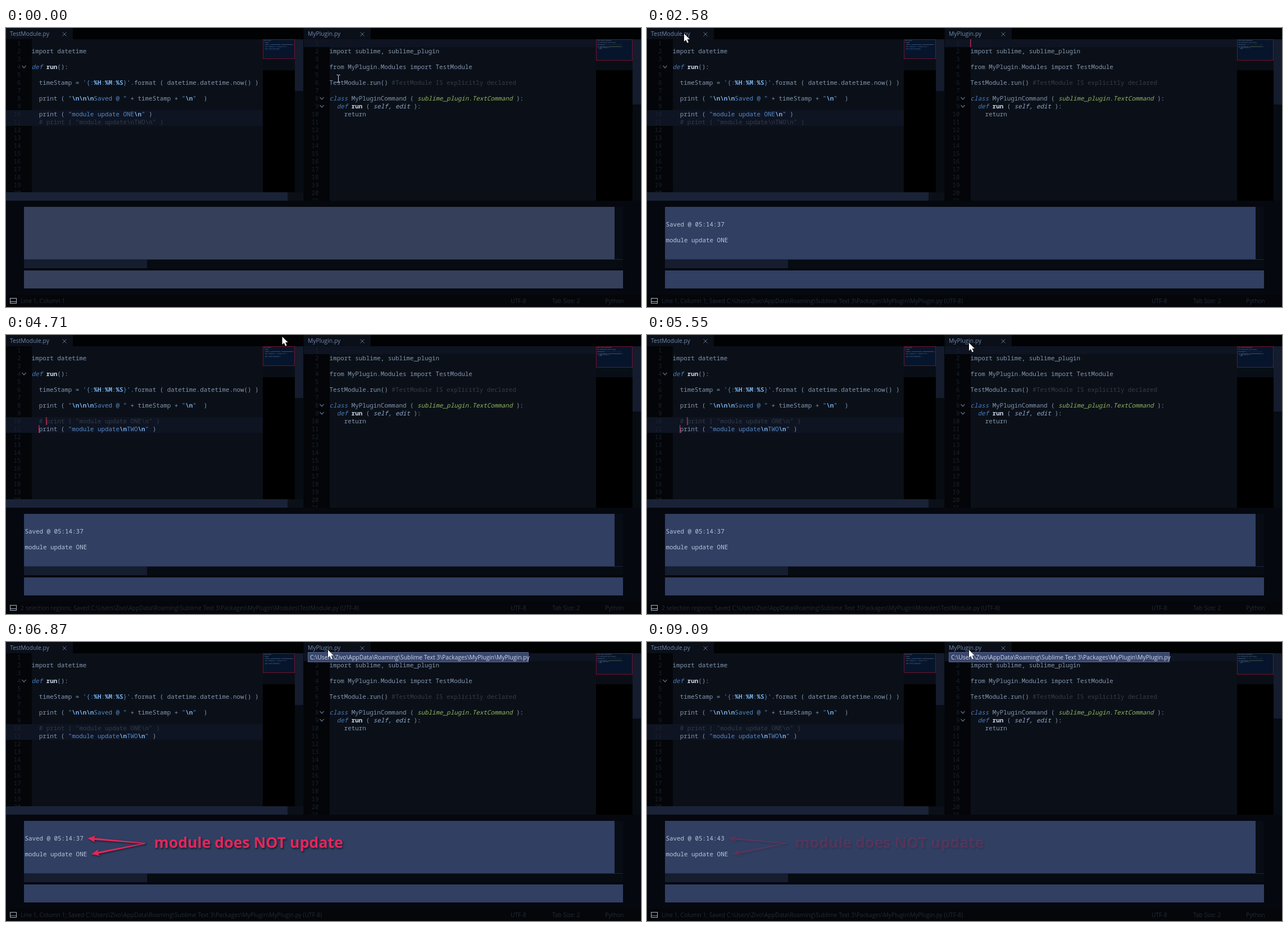
Recreate the animation shown at these times as an HTML page with a canvas. Size 1130 by 496 pixels, loop 9120 ms.

```html
<!DOCTYPE html>
<html lang="en">
<head>
<meta charset="utf-8">
<title>Plugin module reload</title>
<style>
html, body { margin: 0; width: 100%; height: 100%; overflow: hidden; background: #04070b; }
canvas { display: block; }
</style>
</head>
<body>
<canvas id="stage" width="1130" height="496"></canvas>
<script>
const ctx = document.getElementById('stage').getContext('2d');
const LOOP = 9120, CHAR = 6.516, ROW = 14;
const MONO = '10.86px "Noto Sans Mono", "DejaVu Sans Mono", monospace';
const UI = 'px "Open Sans", "Noto Sans", sans-serif';

// Each "~" starts a run: one style letter, then its text.
const STYLES = {
  d: ['', '#8396b0'], i: ['italic ', '#8fa8cc'], k: ['italic ', '#4a7cc0'],
  f: ['bold ', '#cbd6e8'], s: ['', '#5689c6'], e: ['bold ', '#78aee6'],
  c: ['', '#343c48'], g: ['italic ', '#90b55f']
};
const raw = String.raw;
const ONE = raw`module update ONE\n`, TWO = raw`module update\nTWO\n`;
const comment = s => `~c  # print ( "${s}" )`;
const print = s => '~d  print ( ~s"' + s.replace(/\\n/g, raw`~e\n~s`) + '"~d )';
const leftCode = swapped => ({
  2: '~dimport datetime',
  4: '~kdef~f run~d():',
  6: "~d  timeStamp = ~s'{:~e%H~s:~e%M~s:~e%S~s}'~d.format ( datetime.datetime.now() )",
  8: raw`~d  print ( ~s"~e\n\n\n~sSaved @ "~d + timeStamp + ~s"~e\n~s"~d  )`,
  10: swapped ? comment(ONE) : print(ONE),
  11: swapped ? print(TWO) : comment(TWO)
});
const rightCode = {
  2: '~dimport sublime, sublime_plugin',
  4: '~dfrom MyPlugin.Modules import TestModule',
  6: '~dTestModule.run() ~c#TestModule IS explicitly declared',
  8: '~kclass~d MyPluginCommand ( ~gsublime_plugin.TextCommand~d ):',
  9: '~k  def~f run~d ( ~iself, edit~d ):',
  10: '~d    return'
};

const ROOT = raw`C:\Users\Zivo\AppData\Roaming\Sublime Text 3\Packages\MyPlugin` + '\\';
const PLUGIN = ROOT + 'MyPlugin.py';
const MODULE = ROOT + raw`Modules\TestModule.py`;

// Event times in ms
const SAVE1 = 930, OUT1 = 1200, CLICK1 = 2610, TOGGLE = 3390, SAVE2 = 4080,
      CLICK2 = 5570, TIP = 6000, SAVE3 = 6870, OUT2 = 7140;
const RIGHT_BLINK = [[60, 390], [930, 1620], [2130, CLICK1], [CLICK2, TIP]];
const LEFT_BLINK = [[CLICK1, 3660], [4230, 4800], [4950, CLICK2]];
const PATH = [
  [0, 591, 90], [1740, 591, 90], [1950, 362, 58], [2150, 134, 20], [2340, 72, 10],
  [2430, 66, 10], [4200, 66, 10], [4320, 156, 8], [4500, 390, 5], [4710, 491, 3],
  [4800, 542, 7], [5010, 577, 13], [5160, 573, 14], [LOOP, 573, 14]
];

const clamp = v => Math.max(0, Math.min(1, v));
const during = (spans, t) => spans.some(([a, b]) => t >= a && t < b);

function box(x, y, w, h, color) {
  ctx.fillStyle = color;
  ctx.fillRect(x, y, w, h);
}

function text(s, x, y, font, color) {
  ctx.font = font;
  ctx.fillStyle = color;
  ctx.fillText(s, x, y);
}

function stroke(points, color, width = 1, close = false) {
  ctx.beginPath();
  points.forEach(([x, y]) => ctx.lineTo(x, y));
  if (close) ctx.closePath();
  ctx.strokeStyle = color;
  ctx.lineWidth = width;
  ctx.stroke();
}

function runs(line, draw) {
  let col = 0;
  for (const part of line.split('~').slice(1)) {
    const s = part.slice(1);
    draw(s, col, STYLES[part[0]]);
    col += s.length;
  }
}

function tab(x, name) {
  box(x, 0, 119, 20, '#0a0f18');
  text(name, x + 7, 14, 10.3 + UI, '#7189b0');
  const cx = x + 104, c = '#64748e';
  stroke([[cx - 3.5, 7.5], [cx + 3.5, 14.5]], c);
  stroke([[cx + 3.5, 7.5], [cx - 3.5, 14.5]], c);
}

function pane(p, code) {
  const { x, map, mapW, right, bottom } = p;
  ctx.save();
  ctx.beginPath();
  ctx.rect(x, 0, right - x, bottom);
  ctx.clip();
  box(x, 0, right - x, 20, '#010203');
  tab(x, p.name);
  box(x, 20, 46, bottom, '#030508');
  box(x + 46, 20, map - x - 46, bottom, '#0b1018');
  box(x, p.hot, map - x, p.hotH, '#0e1422');
  for (let n = 1; n <= 21; n++) {
    const y = 31 + ROW * (n - 1), s = String(n);
    text(s, x + 26.5 - CHAR * s.length, y, MONO, '#1b232e');
    if (code[n]) runs(code[n], (run, col, [style, color]) =>
      text(run, x + 45.6 + CHAR * col, y, style + MONO, color));
  }
  for (const n of p.folds) {
    const y = 27 + ROW * (n - 1);
    stroke([[x + 28.5, y - 2], [x + 32, y + 2], [x + 35.5, y - 2]], '#5b6b84', 1.3);
  }
  minimap(map, mapW, p.viewH, code);
  box(map + mapW, 20, right - map - mapW, bottom, '#070b12');
  box(map + mapW, 20, right - map - mapW, p.thumb, '#141c2d');
  ctx.restore();
}

function minimap(x, w, h, code) {
  box(x, 20, w, 55, '#090e16');
  box(x, 75, w, 240, '#000');
  box(x, 20, w, h, '#06152c');
  ctx.globalAlpha = 0.45;
  for (const n in code) runs(code[n], (run, col, [, color]) => {
    for (const m of run.matchAll(/\S+/g))
      box(x + 2 + 0.85 * (col + m.index), 20 + 1.8 * (n - 1), 0.85 * m[0].length, 1, color);
  });
  ctx.globalAlpha = 1;
  ctx.strokeStyle = '#74112a';
  ctx.lineWidth = 1;
  ctx.strokeRect(x + 0.5, 20.5, w - 1, h - 1);
}

function statusText(t) {
  const place = t >= CLICK1 && t < CLICK2 ? '2 selection regions' : 'Line 1, Column 1';
  if (t < SAVE1) return place;
  const file = t >= SAVE2 && t < SAVE3 ? MODULE : PLUGIN;
  return `${place}; Saved ${file} (UTF-8)`;
}

function panel(t) {
  box(0, 307, 1130, 167, '#05080e');
  box(0, 474, 1130, 22, '#04060a');
  const tint = 0.3 * (1 - clamp(t / 240));
  for (const [x, y, w, h, color] of [
    [0, 292, 529, 15, '#0b1018'], [0, 292, 501, 15, '#1a2237'],
    [1083, 318, 15, 93, '#080c14'], [32, 412, 1066, 15, '#070b12'],
    [32, 412, 219, 15, '#151d2f'], [32, 411, 1066, 1, '#1d273e'],
    [32, 318, 1051, 93, '#303f62'], [32, 431, 1066, 32, '#303f62']
  ]) box(x, y, w, h, color);
  for (const [y, w, h] of [[318, 1051, 93], [431, 1066, 32]])
    box(32, y, w, h, `rgba(64,64,72,${tint})`);
  if (t >= OUT1) {
    const color = '#b9c6dc';
    text('Saved @ 05:14:' + (t < OUT2 ? 37 : 43), 33.4, 353, MONO, color);
    text('module update ONE', 33.4, 381, MONO, color);
  }
  const dim = '#242c38', font = 10.22 + UI;
  text(statusText(t), 26, 489, font, dim);
  text('UTF-8', 898, 489, font, dim);
  text('Tab Size: 2', 972, 489, font, dim);
  text('Python', 1066, 489, font, dim);
  ctx.strokeStyle = '#a9b3c4';
  ctx.lineWidth = 1;
  ctx.strokeRect(7.5, 480.5, 11, 9);
  box(8, 486, 10, 1, t < CLICK2 ? '#a9b3c4' : '#4f9a5c');
}

function carets(t) {
  const color = '#b82a50';
  if (during(RIGHT_BLINK, t)) box(575, 20, 1.5, ROW, color);
  if (during(LEFT_BLINK, t)) {
    const swapped = t >= TOGGLE;
    box(swapped ? 71 : 58, 146, 1.5, ROW, color);
    box(swapped ? 58 : 71, 160, 1.5, ROW, color);
  }
}

function arrow(x1, y1, x2, y2) {
  const a = Math.atan2(y2 - y1, x2 - x1), len = Math.hypot(x2 - x1, y2 - y1);
  ctx.save();
  ctx.translate(x1, y1);
  ctx.rotate(a);
  ctx.beginPath();
  for (const [x, y] of [[0, -0.8], [len - 12, -1.8], [len - 14, -6], [len, 0],
                        [len - 14, 6], [len - 12, 1.8], [0, 0.8]]) ctx.lineTo(x, y);
  ctx.fill();
  ctx.restore();
}

function note(t) {
  const alpha = Math.min(clamp((t - 6240) / 420), clamp((9180 - t) / 420));
  if (!alpha) return;
  ctx.save();
  ctx.globalAlpha = alpha;
  ctx.shadowColor = 'rgba(0,0,0,.55)';
  ctx.shadowBlur = 3;
  ctx.shadowOffsetX = ctx.shadowOffsetY = 1.5;
  text('module does NOT update', 263.5, 366, 'bold 26.67' + UI, '#e2275b');
  arrow(248, 358, 145, 349);
  arrow(248, 358, 152, 377);
  ctx.restore();
}

function mouse(t) {
  const k = PATH.findIndex(p => p[0] > t);
  const [t0, x0, y0] = PATH[k - 1], [t1, x1, y1] = PATH[k];
  const f = (t - t0) / (t1 - t0);
  const x = x0 + (x1 - x0) * f, y = y0 + (y1 - y0) * f;
  if (y > 20 && (x < 457 || x > 575)) {
    const color = '#d5dae4';
    stroke([[x + 0.5, y - 6], [x + 0.5, y + 6]], color);
    for (const end of [-6.5, 6.5]) {
      stroke([[x - 2.5, y + end], [x, y + end]], color);
      stroke([[x + 1, y + end], [x + 3.5, y + end]], color);
    }
    return;
  }
  ctx.save();
  ctx.translate(x, y);
  stroke([[0, 0], [0, 14], [3.2, 11], [5.6, 16.5], [8, 15.5], [5.6, 10.2], [10, 10]],
    '#000', 1, true);
  ctx.fillStyle = '#fff';
  ctx.fill();
  ctx.restore();
}

function ring(t, start, x, y) {
  const p = (t - start) / 840;
  if (p < 0 || p > 1) return;
  ctx.globalAlpha = 1 - p;
  ctx.beginPath();
  ctx.arc(x, y, 18 * p, 0, 7);
  ctx.strokeStyle = '#e01f3c';
  ctx.lineWidth = 2;
  ctx.stroke();
  ctx.globalAlpha = 1;
}

function tooltip() {
  box(537, 18, 393, 18, '#56638a');
  box(538, 19, 391, 16, '#39476e');
  text(PLUGIN, 541, 31, 10.4 + UI, '#ccd6e8');
}

function draw(t) {
  box(0, 0, 1130, 496, '#04070b');
  pane({ x: 0, name: 'TestModule.py', map: 457, mapW: 57, right: 529, bottom: 292,
         hot: 146, hotH: 28, folds: [4], viewH: 35, thumb: 92 }, leftCode(t >= TOGGLE));
  pane({ x: 530, name: 'MyPlugin.py', map: 1050, mapW: 65, right: 1130, bottom: 307,
         hot: 20, hotH: 14, folds: [8, 9], viewH: 38, thumb: 116 }, rightCode);
  panel(t);
  carets(t);
  note(t);
  ring(t, 2640, 66, 10);
  ring(t, CLICK2, 573, 12);
  if (t >= TIP) tooltip();
  mouse(t);
}

const start = performance.now();
function frame() {
  draw((performance.now() - start) % LOOP);
  requestAnimationFrame(frame);
}
frame();
</script>
</body>
</html>
```
